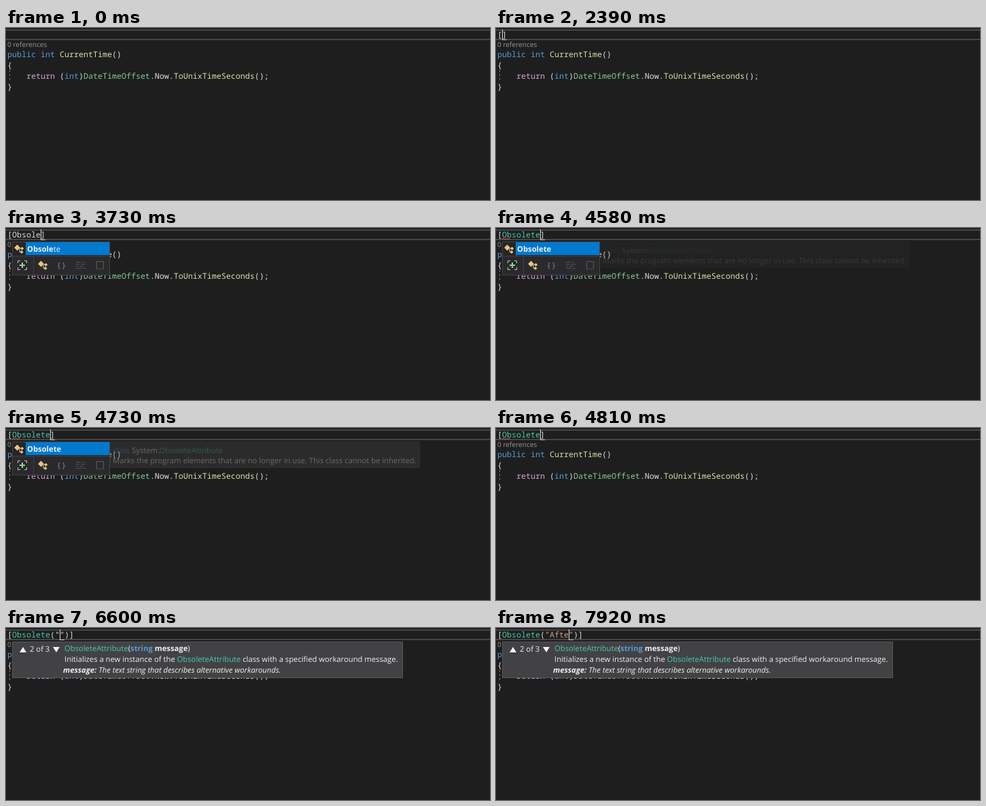
Recreate the animation shown at these times as an HTML page. Size 712 px wide and 254 px high, loop 8 s.

```html
<!DOCTYPE html>
<html lang="en">
<head>
<meta charset="utf-8">
<title>Code editor</title>
<style>
html, body { margin: 0; height: 100%; overflow: hidden; background: #1e1e1e; }
svg { display: block; width: 712px; height: 254px; }
text { white-space: pre; text-rendering: geometricPrecision; font: 11.24px "Open Sans", "Noto Sans", sans-serif; fill: #f1f1f1; }
.code { font: 11.667px "Noto Sans Mono", "DejaVu Sans Mono", monospace; fill: #dcdcdc; }
.lens { font-size: 10.15px; fill: #999; }
.key { fill: #569cd6; }
.flow { fill: #d8a0df; }
.fn { fill: #dcdcaa; }
.struct { fill: #86c691; }
.type { fill: #4ec9b0; }
.str { fill: #d69d85; }
.b { font-weight: bold; }
.i { font-style: italic; }
</style>
</head>
<body>
<svg id="stage" viewBox="0 0 712 254"></svg>
<script>
const LOOP = 8000, COL = 7, LEFT = 2;

// time, text before the caret, text after it
const typing = [
  [0, '', ''], [2320, '[', ''], [2390, '[', ']'], [2940, '[O', ']'], [3340, '[Ob', ']'],
  [3580, '[Obs', ']'], [3650, '[Obso', ']'], [3730, '[Obsole', ']'], [3810, '[Obsolete', ']'],
  [5580, '[Obsolete(', ')]'], [6450, '[Obsolete("', '")]'], [7540, '[Obsolete("A', '")]'],
  [7690, '[Obsolete("Af', '")]'], [7770, '[Obsolete("Aft', '")]'], [7920, '[Obsolete("Afte', '")]']
];
const caretOn = [[1310, 1840], [2320, 3960], [4500, 5050], [5580, 6130], [6450, 6990], [7540, 8000]];
const fade = [[0, 0], [4500, .04], [4580, .12], [4650, .24], [4730, .36], [4810, 0]];

const at = (list, t) => list.filter(s => s[0] <= t).pop();
const within = (t, a, b) => t >= a && t < b;
const rect = (x, y, w, h, fill, more = '') => `<rect x="${x}" y="${y}" width="${w}" height="${h}" fill="${fill}" ${more}/>`;
const panel = (x, y, w, h, fill, line) => rect(x + .5, y + .5, w - 1, h - 1, fill, `stroke="${line}"`);
const path = (d, fill, more = '') => `<path d="${d}" fill="${fill}" ${more}/>`;
const line = (d, color, more = '') => path(d, 'none', `stroke="${color}" ${more}`);
const text = (x, y, s, cls = '') => `<text x="${x}" y="${y}" class="${cls}">${s}</text>`;
const span = (cls, s) => `<tspan class="${cls}">${s}</tspan>`;
const move = (x, y, s, opacity = 1) => `<g transform="translate(${x} ${y})" opacity="${opacity}">${s}</g>`;
const diamond = (x, y, r) => path(`M${x - r} ${y}l${r} ${-r}l${r} ${r}l${-r} ${r}z`, '#efc27f');

const icons = {
  cls: line('M0 -1H5M1 0V4.5H4', '#c8c8c8') + diamond(-2.5, -2, 4.4) + diamond(4.7, -.8, 2.5) + diamond(4, 4.5, 2.5),
  ns: text(-6.5, 4, '{ }', 'b'),
  snip: line('M-4.5 5.5V-5.5H5.5V5.5', '#c8c8c8') + line('M-4 5.5H6', '#c8c8c8', 'stroke-dasharray="2 1"'),
  add: line('M-6.5 -3V-6.5H-3M3 -6.5H6.5V-3M6.5 3V6.5H3M-3 6.5H-6.5V3', '#c8c8c8') +
    line('M-4 0H4M0 -4V4', '#8fd58f', 'stroke-width="2"'),
  key: line('M-7 -4.5H0M2 -4.5H5M-7 -1.5H-2M0 -1.5H7M-7 1.5H-4M-2 1.5H4M-7 4.5H1M3 4.5H7', '#b8b8b8')
};

const base =
  rect(0, 2, 712, 2, '#464646') + rect(0, 16, 712, 2, '#464646') +
  text(2, 28, '0 references', 'lens') +
  text(2, 43, span('key', 'public int ') + span('fn', 'CurrentTime') + '()', 'code') +
  text(2, 59, '{', 'code') +
  text(30, 75, span('flow', 'return ') + '(' + span('key', 'int') + ')' + span('struct', 'DateTimeOffset') +
    '.Now.' + span('fn', 'ToUnixTimeSeconds') + '();', 'code') +
  text(2, 91, '}', 'code') +
  line('M5.5 62V80', '#777', 'stroke-dasharray="3 3"');

function toolbar(y, dim) {
  return rect(10, y - 14, 142, 28, '#2a2a2c') + rect(10, y - 14, 142, 1, '#3f3f46') + rect(40, y - 13, 1, 27, '#3f3f46') +
    move(24, y, icons.add) + move(54, y, icons.cls) +
    ['ns', 'key', 'snip'].map((k, i) => move(82 + 28 * i, y, icons[k], dim)).join('');
}

function fullList(bold) {
  const rows = ['ns Microsoft', 'cls MTAThread', 'snip namespace', 'cls NonSerialized', 'cls Obsolete',
    'cls ParamArray', 'snip prop', 'snip propa', 'snip propdp'];
  return panel(9, 20, 144, 202, '#252526', '#434346') + rect(29, 97, 105, 19, '#0079d0') +
    rows.map((row, i) => {
      const [icon, name] = row.split(' '), y = 31 + 19 * i;
      const label = i === 4 ? span('b', name.slice(0, bold)) + name.slice(bold) : name;
      return move(19, y, icons[icon]) + text(31, y + 4, label);
    }).join('') +
    rect(135, 21, 17, 172, '#3e3e42') + rect(139, 106, 9, 20, '#686868') +
    path('M139 31h9l-4.500 -5z', '#999') + path('M139 181h9l-4.500 5z', '#999') + toolbar(207, 1);
}

function shortList(bold) {
  return panel(9, 20, 144, 50, '#252526', '#434346') + rect(29, 21, 123, 19, '#0079d0') +
    move(19, 31, icons.cls) + text(31, 35, span('b', 'Obsolete'.slice(0, bold)) + 'Obsolete'.slice(bold)) + toolbar(55, .3);
}

const quickInfo = panel(153, 20, 456, 39, '#424245', '#4d4d50') +
  text(157, 37, span('key', 'class') + ' System.' + span('type', 'ObsoleteAttribute')) +
  text(157, 52, 'Marks the program elements that are no longer in use. This class cannot be inherited.');

function signature(n, w, h, args, tail) {
  const name = span('type', 'ObsoleteAttribute');
  return panel(9, 20, w, h, '#424245', '#555558') +
    path('M20 36h10l-5 -8z', '#f1f1f1') + path('M69 28h10l-5 8z', '#f1f1f1') +
    text(35, 35, n + ' of 3') + text(86, 34, name + `(${args})`) +
    text(86, 50, `Initializes a new instance of the ${name} class with ${tail}.`);
}
const plainCall = signature(1, 496, 39, '', 'default properties');
const messageCall = signature(2, 575, 54, span('key b', 'string') + span('b', ' message'), 'a specified workaround message') +
  text(84, 66, span('b', 'message:') + ' The text string that describes alternative workarounds.', 'i');

function popup(t) {
  if (within(t, 3340, 3650)) return fullList(t < 3410 ? 1 : t < 3580 ? 2 : 3);
  if (within(t, 3650, 4810)) return move(0, 0, quickInfo, at(fade, t)[1]) + shortList(at(typing, t)[1].length - 1);
  if (within(t, 5660, 6600)) return plainCall;
  return t >= 6600 ? messageCall : '';
}

function attribute(t) {
  const [, before, after] = at(typing, t), x = LEFT + COL * before.length;
  const colored = (before + after).replace(/"[^"]*"|Obsolete/g, s =>
    s[0] === '"' ? (t >= 6910 ? span('str', s) : s) : (t >= 4190 ? span('type', s) : s));
  return (within(t, 5430, 5580) ? rect(8, 1, 58, 18, '#0e4583') : '') +
    text(LEFT, 14, colored, 'code') +
    (after ? rect(x, 17, COL, 1, '#c8c8c8') : '') +
    (within(t, 4190, 5580) ? line('M9 17l2 -2l2 2l2 -2l2 2l2 -2l2 2', '#e0504a') : '') +
    (caretOn.some(([a, b]) => within(t, a, b)) ? rect(x, 2, 1, 15, '#dcdcdc') : '');
}

const stage = document.getElementById('stage');
let shown;
function draw(now) {
  const t = now % LOOP, view = base + attribute(t) + popup(t);
  if (view !== shown) stage.innerHTML = shown = view;
  requestAnimationFrame(draw);
}
draw(0);
</script>
</body>
</html>
```
